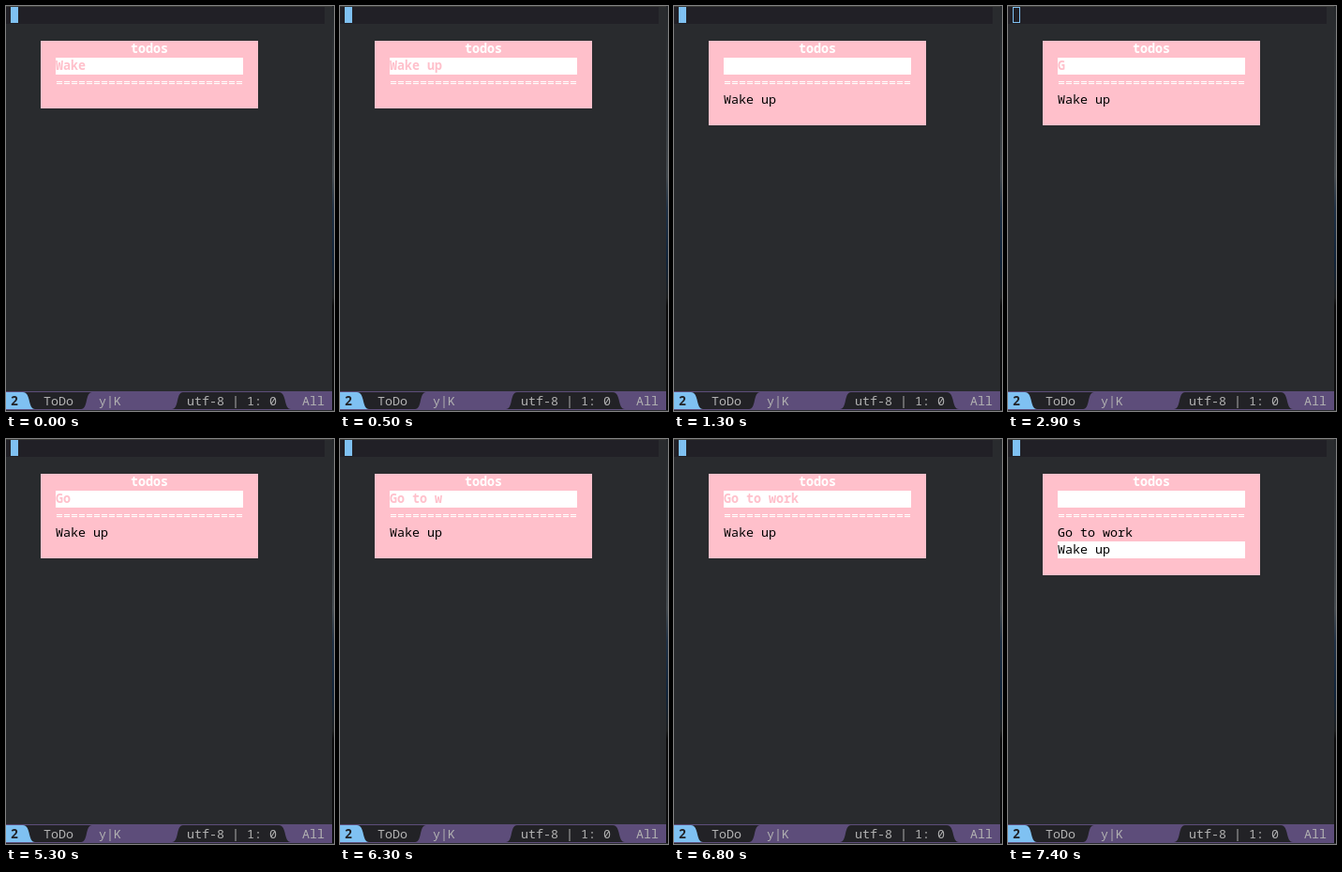
Write an HTML page that moves like this. It is 350x431 px and loops after 8 s.

```html
<!DOCTYPE html>
<html lang="en">
<head>
<meta charset="utf-8">
<title>todos</title>
<style>
  html, body { margin: 0; width: 100%; height: 100%; overflow: hidden; background: #292b2e; }
  svg { display: block; width: 350px; height: 431px; }
  text {
    font: 13.333px "Noto Sans Mono", "DejaVu Sans Mono", monospace;
    fill: #b2b2b2;
    white-space: pre;
  }
  .bold { font-weight: 700; }
  .white { fill: #fff; }
  .pink { fill: #ffc0cb; }
  .black { fill: #000; }
</style>
</head>
<body>
<svg viewBox="0 0 350 431">
  <defs>
    <linearGradient id="edge" x1="0" y1="0" x2="0" y2="1">
      <stop offset="0" stop-color="#25282b"/>
      <stop offset=".3" stop-color="#3a3f44"/>
      <stop offset=".42" stop-color="#454b50"/>
      <stop offset=".5" stop-color="#1f3145"/>
      <stop offset=".63" stop-color="#10233a"/>
      <stop offset=".72" stop-color="#1d1f20"/>
      <stop offset=".74" stop-color="#0b0b0c"/>
      <stop offset="1" stop-color="#0b0b0c"/>
    </linearGradient>
  </defs>
  <rect width="350" height="431" fill="#292b2e"/>
  <rect y="1" width="340" height="18" fill="#212026"/>
  <rect width="350" height="1" fill="#3b3b38"/>
  <rect x="348" width="2" height="431" fill="url(#edge)"/>
  <rect x="5" y="1" width="8" height="17" fill="#7fc1f2"/>
  <rect id="hollow" x="6" y="2" width="6" height="15" fill="#212026"/>

  <rect id="panel" class="pink" x="37" y="37" width="232" height="72"/>
  <text class="bold white" x="133" y="50">todos</text>
  <rect class="white" x="53" y="55" width="200" height="18"/>
  <text id="entry" class="bold pink" x="53" y="68"></text>
  <text class="white" x="53" y="86">=========================</text>
  <rect id="stripe" class="white" x="53" y="109" width="200" height="18"/>
  <text id="item0" class="black" x="53" y="104"></text>
  <text id="item1" class="black" x="53" y="122"></text>

  <rect y="410" width="348" height="20" fill="#5d4d7a"/>
  <path fill="#222226" d="M0 411H92C84 411 88 429 80 429H0Z"/>
  <path fill="#7fc1f2" d="M0 411H18C27 411 23 429 31 429H0Z"/>
  <path fill="#222226" d="M189 411H291C300 411 296 429 304 429H177C185 429 181 411 189 411Z"/>
  <rect y="430" width="350" height="1" fill="#292b2e"/>
  <text class="bold" x="5" y="425" style="fill:#222226">2</text>
  <text x="40" y="425">ToDo</text>
  <text x="99" y="425">y|K</text>
  <text x="193" y="425">utf-8 | 1: 0</text>
  <text x="316" y="425">All</text>
</svg>
<script>
  const LOOP = 8000;
  // [start ms, text in the entry field, saved items]
  const steps = [
    [0, "Wake", []],
    [500, "Wake up", []],
    [1300, "", ["Wake up"]],
    [2900, "G", ["Wake up"]],
    [3000, "Go", ["Wake up"]],
    [3300, "Got", ["Wake up"]],
    [5300, "Go", ["Wake up"]],
    [5600, "Go to", ["Wake up"]],
    [6300, "Go to w", ["Wake up"]],
    [6500, "Go to wo", ["Wake up"]],
    [6800, "Go to work", ["Wake up"]],
    [7400, "", ["Go to work", "Wake up"]]
  ];
  const $ = id => document.getElementById(id);
  const show = (id, on) => $(id).setAttribute("visibility", on ? "visible" : "hidden");
  let shown;

  function render(t) {
    const step = steps.findLast(s => s[0] <= t);
    if (step === shown) return;
    shown = step;
    const [start, entry, items] = step;
    $("entry").textContent = entry;
    $("item0").textContent = items[0] || "";
    $("item1").textContent = items[1] || "";
    $("panel").setAttribute("height", 72 + 18 * items.length);
    show("stripe", items.length > 1);
    show("hollow", start === 2900);
  }

  const origin = performance.now();
  function tick() {
    render((performance.now() - origin) % LOOP);
    requestAnimationFrame(tick);
  }
  tick();
</script>
</body>
</html>
```
